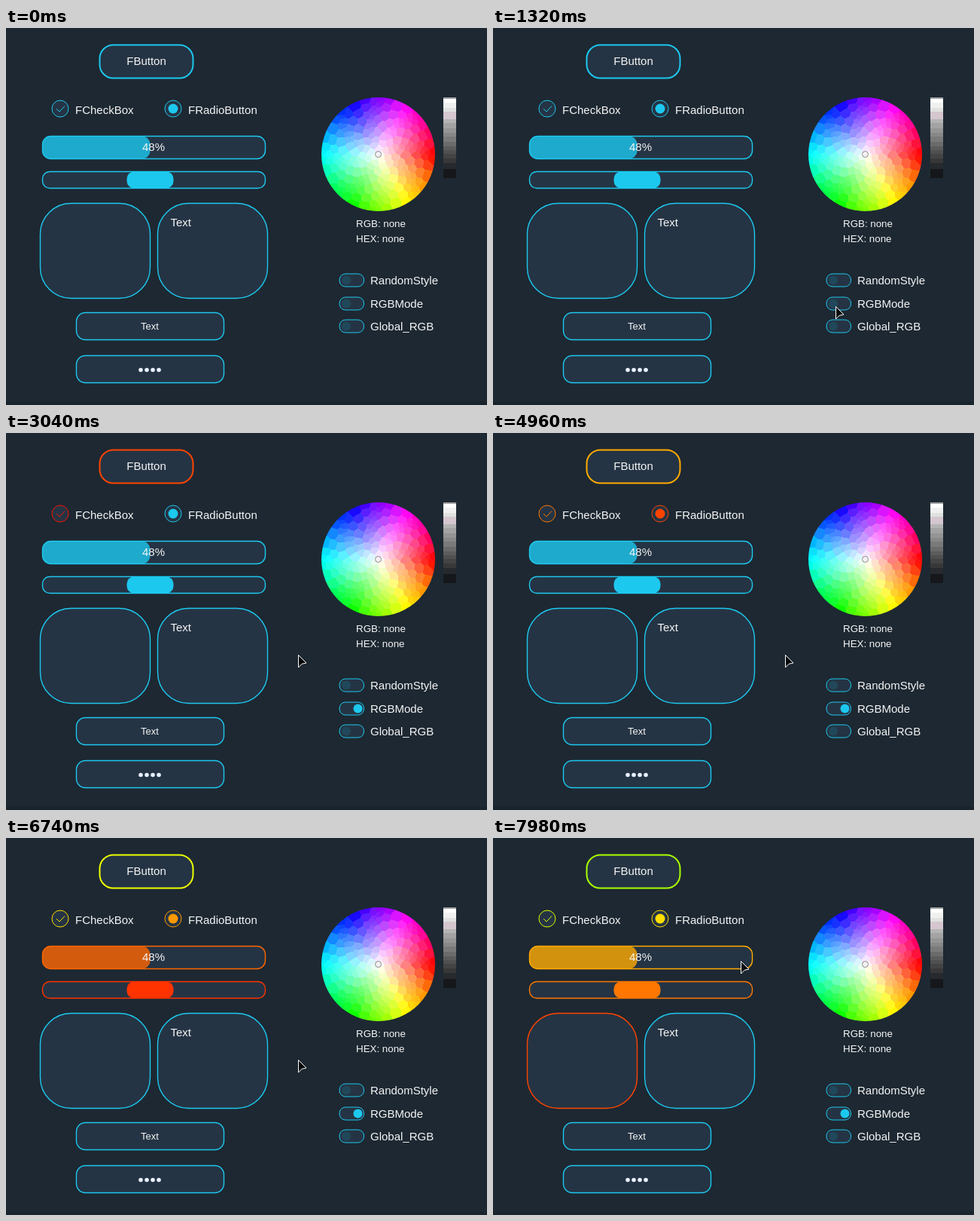
These frames come from a looping animation (639 by 500 pixels, 8 s). An HTML page with a canvas:

```html
<!DOCTYPE html>
<html lang="en">
<head>
<meta charset="utf-8">
<title>Control showcase</title>
<style>
  html, body { margin: 0; width: 100%; height: 100%; overflow: hidden; background: #1d2832; }
  #stage { position: relative; width: 639px; height: 500px; overflow: hidden; color: #1dc8ee; }
  svg { position: absolute; left: 0; top: 0; }
  #wheel { position: absolute; left: 419px; top: 92px; border-radius: 50%; }
  text { fill: #f5f5f5; font: 15px "Liberation Sans", Arial, sans-serif; }
  .info { font-size: 13.33px; }
  .field { font-size: 13px; }
  .mid { text-anchor: middle; }
  .box { fill: #253444; stroke: currentColor; stroke-width: 1.4; }
  .thin { stroke-width: 1; }
  .solid { fill: currentColor; }
  .off { fill: #20485a; }
</style>
</head>
<body>
<div id="stage">
  <canvas id="wheel" width="151" height="151"></canvas>
  <svg width="639" height="500" viewBox="0 0 639 500">
    <rect y="495.5" width="639" height="5" fill="#19232b"/>

    <g id="button">
      <rect class="box" x="124.5" y="22.5" width="124" height="44" rx="18" style="stroke-width:2"/>
      <text class="mid" x="186.5" y="49">FButton</text>
    </g>

    <g id="check">
      <circle class="box thin" cx="72" cy="107" r="11"/>
      <path d="M67 107l4 4 7-7.5" fill="none" stroke="currentColor"/>
    </g>
    <text x="92" y="114">FCheckBox</text>

    <g id="radio">
      <circle class="box thin" cx="222" cy="107" r="11"/>
      <circle class="solid" cx="222" cy="107" r="6.5"/>
    </g>
    <text x="242" y="114">FRadioButton</text>

    <g id="progress">
      <rect class="box" x="48.5" y="143.5" width="296" height="30" rx="11"/>
      <rect class="solid" x="48.5" y="143.5" width="143" height="30" rx="11" opacity=".8"/>
      <text class="mid" x="196" y="163">48%</text>
    </g>

    <g id="slider">
      <rect class="box" x="48.5" y="190.5" width="296" height="22" rx="9.5"/>
      <rect class="solid" x="160.5" y="190.5" width="62" height="22" rx="9.5"/>
    </g>

    <g id="area">
      <rect class="box" x="45.5" y="232.5" width="146" height="126" rx="41"/>
    </g>
    <rect class="box" x="201.5" y="232.5" width="146" height="126" rx="41"/>
    <text x="218.5" y="263">Text</text>

    <rect class="box" x="93.5" y="377.5" width="196" height="36" rx="12"/>
    <text class="field mid" x="191" y="400">Text</text>
    <rect class="box" x="93.5" y="434.5" width="196" height="36" rx="12"/>
    <path d="M179 453.5h.01m8 0h.01m8 0h.01m8 0h.01" stroke="#e8effc" stroke-width="5.6" stroke-linecap="round"/>

    <circle cx="494.5" cy="167.5" r="4" fill="#f4f0f4" stroke="#8a8a8a"/>
    <g id="grays"></g>
    <text class="info" x="465" y="264">RGB: none</text>
    <text class="info" x="465" y="284">HEX: none</text>

    <g id="toggles"></g>

    <path id="cursor" d="M.5 .5V17L5 12.3 11 11Z" fill="#05070a" stroke="#fff" stroke-linejoin="round"/>
  </svg>
</div>
<script>
const LOOP = 8000, TICK = 306, HUE_STEP = 4;
const el = id => document.getElementById(id);

// Moment each control joins the hue cycle
const starts = { button: 2052, check: 3040, radio: 4010, progress: 4985, slider: 5950, area: 7040 };

// Pointer path: time, x, y
const path = [
  [0, 532, 506], [150, 532, 506], [300, 500, 484], [480, 440, 458], [640, 396, 430],
  [760, 398, 404], [960, 430, 376], [1100, 442, 371], [1320, 455, 369], [1880, 455, 369],
  [2100, 440, 350], [2350, 412, 318], [2560, 394, 299], [2710, 388, 294],
  [7200, 388, 294], [7300, 397, 299], [7340, 403, 303], [7420, 406, 300],
  [7600, 388, 262], [7800, 354, 205], [7980, 329, 163], [8000, 329, 163]
];

function pointerAt(t) {
  const i = path.findIndex(p => p[0] > t);
  const [t0, x0, y0] = path[i - 1], [t1, x1, y1] = path[i];
  const k = (t - t0) / (t1 - t0);
  return [Math.round(x0 + (x1 - x0) * k), Math.round(y0 + (y1 - y0) * k)];
}

function hueColor(t, start) {
  if (t < start) return "";
  const ticks = Math.floor((t - start) / TICK) + 1;
  return `hsl(${ticks * HUE_STEP}, 100%, 50%)`;
}

function buildToggles() {
  el("toggles").innerHTML = [["RandomStyle", 326], ["RGBMode", 357], ["Global_RGB", 387]]
    .map(([name, y], i) => `
      <rect class="box thin" x="443" y="${y}" width="32.5" height="17" rx="8"/>
      <circle class="off" id="knob${i}" cx="452" cy="${y + 8.5}" r="6"/>
      <text x="484" y="${y + 14}">${name}</text>`).join("");
}

function buildGrays() {
  const bands = [
    [92, "#a3a3a3"], [94, "#fff"], [99, "#f0f0f0"], [106, "#dfe2df"], [111, "#d5c6cf"],
    [121, "#b4b4b4"], [126, "#a3a3a3"], [133, "#959595"], [139, "#888"], [144, "#7a7a7a"],
    [151, "#6b6b6b"], [157, "#5c5c5c"], [162, "#505050"], [167, "#444"], [173, "#383838"],
    [179, "#262a2e"], [187, "#15171a"]
  ];
  el("grays").innerHTML = bands.map(([y, c]) =>
    `<rect x="581" y="${y}" width="17" height="${199 - y}" fill="${c}"/>`).join("");
}

function hsv(hue, sat) {
  return [5, 3, 1].map(n => {
    const k = (n + hue / 60) % 6;
    return 255 * (1 - sat * Math.max(0, Math.min(k, 4 - k, 1)));
  });
}

// Hue disc made of small flat cells around spiral points
function buildWheel() {
  const size = 151, mid = 75, count = 240, golden = 2.39996;
  const seeds = Array.from({ length: count }, (_, i) => {
    const r = 76 * Math.sqrt((i + .3) / count);
    const a = i * golden + .12 * Math.sin(i * 12.9);
    const hue = (a * 180 / Math.PI + 360) % 360;
    return { x: mid + r * Math.cos(a), y: mid + r * Math.sin(a), rgb: hsv(hue, Math.min(1, r / 73)) };
  });
  const ctx = el("wheel").getContext("2d");
  const img = ctx.createImageData(size, size);
  for (let y = 0; y < size; y++) for (let x = 0; x < size; x++) {
    let best = Infinity, near;
    for (const s of seeds) {
      const d = (s.x - x) ** 2 + (s.y - y) ** 2;
      if (d < best) { best = d; near = s; }
    }
    img.data.set([...near.rgb, 255], (y * size + x) * 4);
  }
  ctx.putImageData(img, 0, 0);
}

function draw() {
  const t = performance.now() % LOOP;
  for (const id in starts) el(id).style.color = hueColor(t, starts[id]);

  const knob = el("knob1"), on = t >= 1580;
  knob.setAttribute("cx", t >= 1630 ? 467.5 : on ? 460 : 452);
  knob.setAttribute("class", on ? "solid" : "off");

  el("cursor").setAttribute("transform", `translate(${pointerAt(t)})`);
  requestAnimationFrame(draw);
}

buildToggles();
buildGrays();
buildWheel();
draw();
</script>
</body>
</html>
```
